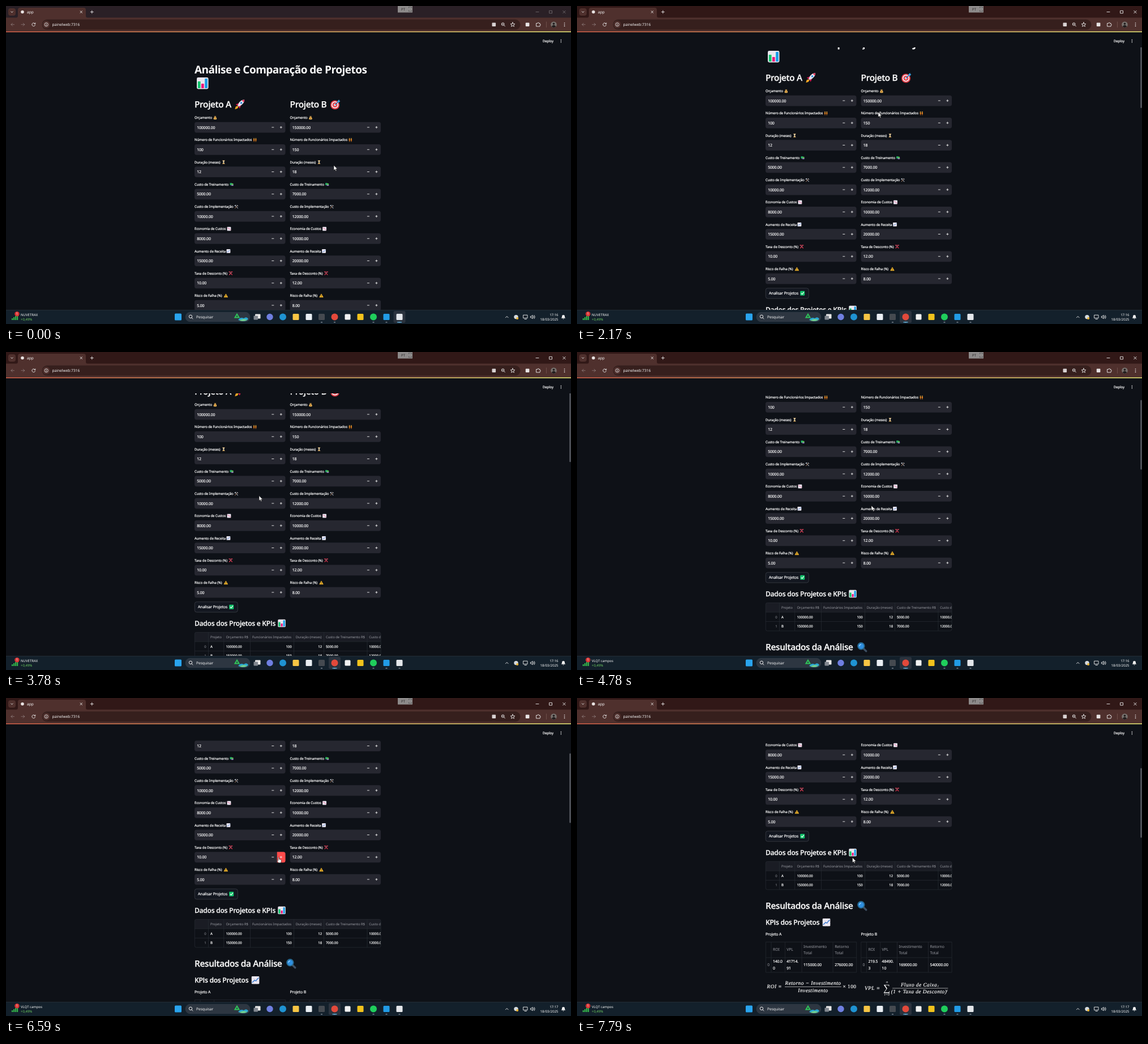
Recreate the animation shown at these times as an HTML page. Size 998 px wide and 561 px high, loop 8000 ms.

```html
<!DOCTYPE html>
<html lang="pt">
<head>
<meta charset="utf-8">
<title>app</title>
<style>
html, body { margin: 0; width: 100%; height: 100%; overflow: hidden; background: #0e1117; }
svg { display: block; width: 998px; height: 561px; }
text { font-family: "Noto Sans", "Open Sans", sans-serif; fill: #fafafa; white-space: pre; text-rendering: geometricPrecision; }
.h1 { font-size: 19px; font-weight: 700; letter-spacing: -.027em; }
.h2, .h3 { font-family: "Open Sans", "Noto Sans", sans-serif; font-weight: 600; letter-spacing: -.023em; stroke: #fafafa; stroke-width: .25px; }
.h2 { font-size: 15.4px; }
.h3 { font-size: 12.1px; }
.lab, .val, .math { stroke: #fafafa; stroke-width: .2px; }
.lab { font-size: 6px; letter-spacing: -.016em; }
.val { font-size: 6.9px; letter-spacing: -.02em; }
.head { font-size: 6px; letter-spacing: -.015em; fill: #9a9ca3; }
.grey { font-size: 6.9px; letter-spacing: -.02em; fill: #9a9ca3; }
.end { text-anchor: end; }
.ui { font-size: 6.6px; }
.sys { font-size: 6px; }
.mid { text-anchor: middle; }
.math { font: italic 9.4px "Liberation Serif", "Noto Serif", serif; letter-spacing: .45px; }
.sub { font: italic 6.5px "Liberation Serif", "Noto Serif", serif; }
.sum { font: 17px "Liberation Serif", "Noto Serif", serif; }
.line { fill: none; stroke: #eee; stroke-width: .9; stroke-linecap: round; stroke-linejoin: round; }
.grid { fill: none; stroke: #282b33; stroke-width: .7; }
</style>
</head>
<body>
<svg id="stage" viewBox="0 0 998 561" xmlns="http://www.w3.org/2000/svg"></svg>
<script>
const text = (x, y, s, cls, extra = '') => `<text x="${x}" y="${y}" class="${cls}" ${extra}>${s}</text>`;
const rect = (x, y, w, h, fill, r = 0, extra = '') => `<rect x="${x}" y="${y}" width="${w}" height="${h}" rx="${r}" fill="${fill}" ${extra}/>`;
const dot = (x, y, r, fill, extra = '') => `<circle cx="${x}" cy="${y}" r="${r}" fill="${fill}" ${extra}/>`;
const path = (d, fill, extra = '') => `<path d="${d}" fill="${fill}" ${extra}/>`;
const line = (d, extra = '') => `<path d="${d}" class="line" ${extra}/>`;
const stroke = (d, color, w) => `<path d="${d}" fill="none" stroke="${color}" stroke-width="${w}" stroke-linecap="round"/>`;

// Pictograms in a 10 x 10 box
const chartPaper = rect(0, 0, 10, 10, '#f1eef6', 1) + stroke('M0 3.3H10M0 6.6H10M3.3 0V10M6.6 0V10', '#cfc6dc', .35);
const icons = {
  bars: rect(0, 0, 10, 10, '#e9e6ee', 1.2) + rect(.9, 3.4, 2.3, 5.9, '#10c46c', .3) + rect(3.9, 5.4, 2.3, 3.9, '#f0157c', .3) + rect(6.9, 1, 2.3, 8.3, '#189de8', .3),
  rocket: path('M1 5 4 3.6 3 6.4ZM5 9 6.4 6 3.6 7Z', '#d3184f') + path('M9.8.2C7 .2 4.4 2 3 6L4 7C8 5.6 9.8 3 9.8.2Z', '#e4dfec')
    + path('M9.8.2 7.2.8 9.2 2.8Z', '#e8284f') + dot(6.6, 3.4, 1, '#2a8fd8') + path('M3 6.4 1 7.2 .2 9.8 2.8 9 3.8 7.2Z', '#f9a825'),
  target: dot(4.6, 5.4, 4.6, '#e33b45') + dot(4.6, 5.4, 3.5, '#f4f1f5') + dot(4.6, 5.4, 2.5, '#e33b45') + dot(4.6, 5.4, 1.2, '#f4f1f5')
    + stroke('M4.6 5.4 8 2', '#2a6fb0', .8) + path('M7 3 7.2 1.4 8.8 0 9 1.2 10 1.5 8.6 3Z', '#35a7e8'),
  money: path('M3.4 3C.5 5.5.2 9.8 2.4 9.8H7.6C9.8 9.8 9.5 5.5 6.6 3L7.6.8 5 1.4 2.4.8Z', '#e9b65a') + rect(3, 2.6, 4, .9, '#8c5a2b', .4) + dot(5, 6.6, 1.6, '#a96d1e'),
  people: [2.6, 7.4].map(x => dot(x, 1.6, 1.4, '#f3b23c') + rect(x - 1.6, 3.2, 3.2, 3.7, '#f58a1f', .8) + rect(x - 1, 6.6, 2, 3.4, '#b5651d')).join(''),
  hourglass: path('M2.5 1H7.5C7.5 4 5.6 4.4 5.6 5S7.5 6 7.5 9H2.5C2.5 6 4.4 5.6 4.4 5S2.5 4 2.5 1Z', '#e8e0c8') + path('M3.2 8.8 5 6.4 6.8 8.8ZM3.6 3H6.4L5 4.8Z', '#e5a93b') + rect(1.8, 0, 6.4, 1.2, '#b98d4f') + rect(1.8, 8.8, 6.4, 1.2, '#b98d4f'),
  books: rect(0, 1.4, 5.6, 5.8, '#20b268', .6) + rect(3.4, 3.2, 5.6, 5.6, '#7646b8', .6) + rect(4, 2.6, 4.6, 4, '#56c64a', .5) + rect(4.4, 7.6, 4.6, .8, '#ded5f0'),
  tools: stroke('M2.2 2.2 8.6 9', '#a9b0ba', 1.5) + stroke('M7.6 2.4 1.6 9', '#8c6a55', 1.5) + path('M0 2.8 2.8.2 4.4 1.6 1.6 4.2Z', '#c3cad3') + stroke('M7 1.2 7.6 2.8 9.2 3.2', '#c3cad3', 1.3),
  down: chartPaper + stroke('M1 2 4 5 5.6 4 9 8', '#e0457a', 1.1),
  up: chartPaper + stroke('M1 8 4 5 5.6 6 9 2', '#3f7fd2', 1.1),
  cut: stroke('M1.6 1 8 8M8.4 1 2 8', '#d8dbe2', 1) + stroke('M.8 1.4H4M6 1.4H9.2M1.4 8.6 4.6 5M8.6 8.6 5.4 5', '#e12f48', 1.8),
  warn: path('M5 .6 9.8 9.2H.2Z', '#f6b92c', 'stroke="#f6b92c" stroke-linejoin="round"') + stroke('M5 3.6V6.2M5 7.8V7.9', '#3a2a12', 1.1),
  check: rect(0, 0, 10, 10, '#12c46b', 1.4) + stroke('M2.4 5.2 4.3 7.2 7.8 2.8', '#fff', 1.4),
  lens: stroke('M6.4 6.4 9 9', '#3d4f62', 1.9) + dot(3.9, 3.9, 3.3, '#2f8fe0', 'stroke="#27688f" stroke-width="1.1"') + stroke('M2.2 3.6A2 2 0 0 1 3.6 2.2', '#a5d9ff', .7)
};
const icon = (name, x, y, size) => `<g transform="translate(${x} ${y}) scale(${size / 10})">${icons[name]}</g>`;

const fields = [
  ['Orçamento', 'money', 366, '100000.00', '150000.00'],
  ['Número de Funcionários Impactados', 'people', 436.3, '100', '150'],
  ['Duração (meses)', 'hourglass', 381, '12', '18'],
  ['Custo de Treinamento', 'books', 395.5, '5000.00', '7000.00'],
  ['Custo de Implementação', 'tools', 403.5, '10000.00', '12000.00'],
  ['Economia de Custos', 'down', 390.5, '8000.00', '10000.00'],
  ['Aumento de Receita', 'up', 389.5, '15000.00', '20000.00'],
  ['Taxa de Desconto (%)', 'cut', 393.5, '10.00', '12.00'],
  ['Risco de Falha (%)', 'warn', 385, '5.00', '8.00']
];
const ROW = 39.25;

function form() {
  let out = '';
  fields.forEach(([label, pic, px, a, b], i) => {
    [a, b].forEach((value, col) => {
      const x = 333 + col * 168.6, y = 204.7 + i * ROW;
      out += text(x, y - 5.5, label, 'lab') + icon(pic, px + col * 168.6, y - 11.2, 6.8)
        + rect(x, y, 160.5, 18.7, '#262730', 3.6);
      if (i === 7 && !col) out += path(`M478.8 ${y}H490a3.5 3.5 0 0 1 3.5 3.5V${y + 15.2}a3.5 3.5 0 0 1-3.5 3.5H478.8Z`, '#ff4b4b', 'id="hot"');
      out += text(x + 4.2, y + 11.8, value, 'val')
        + line(`M${x + 136.7} ${y + 9.3}h3.2M${x + 151.2} ${y + 9.3}h3.2m-1.6-1.6v3.2`);
    });
  });
  return out;
}

function dataTable() {
  const heads = [[361, 'Projeto'], [388.5, 'Orçamento R$'], [435, 'Funcionários Impactados'], [511.8, 'Duração (meses)'], [565, 'Custo de Treinamento R$'], [641.3, 'Custo de Implementação']];
  const rows = [['A', '100000.00', '100', '12', '5000.00', '10000.00'], ['B', '150000.00', '150', '18', '7000.00', '12000.00']];
  const edge = { 2: 504.5, 3: 558 };
  let out = rect(333.3, 598.5, 328.7, 16.5, '#1a1c24');
  out += heads.map(([x, s]) => text(x, 609.2, s, 'head')).join('');
  rows.forEach((row, r) => {
    const y = 625.7 + r * 16.5;
    out += text(353.5, y, r, 'head end');
    row.forEach((s, c) => out += text(edge[c] || heads[c][0], y, s, edge[c] ? 'lab end' : 'lab'));
  });
  const cols = [357.5, 384.7, 431.5, 508.5, 561.5, 638].map(x => `M${x} 598.5V648`).join('');
  return `<g clip-path="url(#tableClip)">${out}<path class="grid" d="${cols}M333 615H662M333 631.5H662"/></g>`
    + rect(333.3, 598.5, 328.7, 49.5, 'none', 3, 'stroke="#282b33" stroke-width=".7"');
}

function kpiTable(x, roi, vpl, cost, gain) {
  const cols = [9.6, 34, 63.7, 118.7].map(d => `M${x + d} 740.5V794`).join('');
  return `<path class="grid" d="M${x} 740.5h160.3v53.5h-160.3zM${x} 768h160.3${cols}"/>`
    + [[12.6, 756.4, 'ROI'], [36.8, 756.4, 'VPL'], [66.6, 750.6, 'Investimento'], [66.6, 762, 'Total'], [121.8, 750.6, 'Retorno'], [121.8, 762, 'Total'], [2.8, 782.8, '0']]
      .map(([d, y, s]) => text(x + d, y, s, 'grey')).join('')
    + [[12.6, 777, roi[0]], [12.6, 788.6, roi[1]], [36.8, 777, vpl[0]], [36.8, 788.6, vpl[1]], [66.6, 782.8, cost], [121.8, 782.8, gain]]
      .map(([d, y, s]) => text(x + d, y, s, 'val')).join('');
}

function formulas() {
  return text(335.5, 822, 'ROI =', 'math') + text(417, 816, 'Retorno − Investimento', 'math mid')
    + text(417, 828.5, 'Investimento', 'math mid') + text(469.5, 822, '× 100', 'math', 'style="font-style:normal"')
    + text(508, 825, 'VPL =', 'math') + text(541, 826.5, '∑', 'sum') + text(547.5, 812.5, 'n', 'sub mid') + text(547.5, 835, 't=0', 'sub mid')
    + text(604, 818.5, 'Fluxo de Caixa', 'math mid') + text(637, 820, 't', 'sub')
    + text(604, 831, '(1 + Taxa de Desconto)', 'math mid') + text(653, 827.5, 't', 'sub')
    + stroke('M367.5 819.5H466.5M557.5 822H655', '#fafafa', .6);
}

function page() {
  return text(333, 118.6, 'Análise e Comparação de Projetos', 'h1') + icon('bars', 337, 126, 20.5)
    + text(333, 179.4, 'Projeto A', 'h2') + icon('rocket', 404, 165, 17.5)
    + text(501.6, 179.4, 'Projeto B', 'h2') + icon('target', 573, 165, 17.5)
    + form()
    + rect(333.3, 544.8, 76, 18.2, '#131720', 3.6, 'stroke="#42454d" stroke-width=".7"')
    + text(339, 556.4, 'Analisar Projetos', 'val') + icon('check', 394.2, 549.8, 8)
    + text(333, 586.8, 'Dados dos Projetos e KPIs', 'h3') + icon('bars', 480.3, 575.8, 13.5)
    + dataTable()
    + text(333, 682.3, 'Resultados da Análise', 'h2') + icon('lens', 495, 668, 17.5)
    + text(333, 710.4, 'KPIs dos Projetos', 'h3') + icon('up', 433.8, 699, 13.5)
    + text(333, 729.4, 'Projeto A', 'val') + text(501.6, 729.4, 'Projeto B', 'val')
    + kpiTable(333.4, ['140.0', '0'], ['41714.', '91'], '115000.00', '276000.00')
    + kpiTable(501.8, ['219.5', '3'], ['48490.', '10'], '169000.00', '540000.00')
    + formulas();
}

function browser() {
  return rect(0, 0, 998, 23, '#311817', 0, 'id="strip"') + rect(0, 20.5, 998, 24.3, '#4f302d')
    + path('M17 21Q21 21 21 17V7Q21 3 25 3H137Q141 3 141 7V17Q141 21 145 21Z', '#4f302d')
    + rect(4, 4, 13, 13, '#4f302d', 4) + line('M8.8 9.8 10.5 11.4 12.2 9.8')
    + dot(29, 10.5, 2.8, '#e8e2e2') + text(37, 13, 'app', 'ui')
    + line('M131 8.7 134.6 12.3M134.6 8.7 131 12.3M149.3 10.5H154.3M151.8 8V13')
    + `<g id="controls">${line('M936 10.5H941M960 8.3H964.5V12.8H960ZM983.7 8.3 988.2 12.8M988.2 8.3 983.7 12.8', 'stroke-width=".7"')}</g>`
    + line('M14.5 32.7H9M11.5 30.2 9 32.7 11.5 35.2M27 32.7H32.7M30.2 30.2 32.7 32.7 30.2 35.2', 'opacity=".35"')
    + line('M51.4 31.4A2.9 2.9 0 1 0 51.6 33.6M51.8 29.8V31.6H50')
    + rect(63.5, 23.8, 845, 18, '#361f1d', 9)
    + dot(71.2, 32.7, 6.4, '#4f302d') + dot(71.2, 32.7, 3.1, 'none', 'stroke="#eee" stroke-width=".8"') + line('M71.2 32.6V34.2M71.2 31.1V31.2')
    + text(81.5, 35.2, 'painelweb:7316', 'ui')
    + rect(858.5, 29.4, 6.6, 6.6, '#d8d2d2', 1)
    + dot(877.7, 32, 2.4, 'none', 'stroke="#eee" stroke-width=".9"') + line('M879.5 33.8 881.4 35.8M876.7 32H878.7')
    + line('M895 28.9 896.1 31.5 898.8 31.7 896.7 33.5 897.4 36.2 895 34.7 892.6 36.2 893.3 33.5 891.2 31.7 893.9 31.5Z', 'stroke-width=".8"')
    + rect(917.8, 29.4, 6.6, 6.6, '#e8e4e4', 1)
    + line('M937 30.5H939A1.2 1.2 0 0 1 941.4 30.5H943V32A1.2 1.2 0 0 1 943 34.4V36H937Z')
    + stroke('M954.5 28V37.5', '#7a5c58', .7)
    + dot(967.5, 32.7, 5.3, '#77716d') + dot(967.5, 31.2, 1.8, '#211d1d') + path('M963.6 36.2Q967.5 30.6 971.4 36.2Q967.5 39.6 963.6 36.2Z', '#211d1d')
    + [30, 32.7, 35.4].map(y => dot(986.5, y, .8, '#eee')).join('')
    + rect(0, 44.8, 998, 1.4, 'url(#deco)')
    + text(948, 64, 'Deploy', 'lab') + [59.6, 61.8, 64].map(y => dot(980.4, y, .75, '#fafafa')).join('')
    + rect(692, 0, 26, 11.5, '#8d8a8a') + text(698, 7.8, 'PT', 'sys', 'style="fill:#2a2626"')
    + stroke('M711.5 3.2V1.6H713M714.8 1.6H716.3V3.2M711.5 7.8V9.4H713M714.8 9.4H716.3V7.8', '#444', .7);
}

function taskbar() {
  const square = (x, c, s = 11) => rect(x - s / 2, 548.5 - s / 2, s, s, c, 1.5);
  return rect(0, 536, 998, 25, '#13202b') + rect(0, 536, 998, .6, '#2c343f')
    + rect(10, 551, 2.2, 3, '#33b34a') + rect(13, 549, 2.2, 5, '#33b34a') + rect(16, 547, 2.2, 7, '#33b34a') + rect(19, 545, 2.2, 9, '#33b34a')
    + dot(19.5, 543.3, 4.2, '#d93636') + text(19.5, 545.4, '1', 'sys mid')
    + '<text id="ticker" x="26" y="546.8" class="sys"></text>' + text(26, 554.8, '+0,49%', 'sys', 'style="fill:#6ccb5f"')
    + square(304, '#29a4ee', 12)
    + rect(317, 540.3, 114, 16.5, '#2d3641', 8.2, 'stroke="#3b444f" stroke-width=".5"')
    + dot(326, 547.8, 2.7, 'none', 'stroke="#eee" stroke-width="1"') + line('M328 549.8 330 552') + text(336, 551, 'Pesquisar', 'ui')
    + stroke('M404.5 549.5 408 543.6 411.5 549.5Z', '#2fc45a', 2) + path('M410 554Q414 548 420 551Q425 547 428 552Q426 556 418 556Z', '#2ba7d0') + path('M412 555Q419 550 426 554Q421 557 412 555Z', '#79d28a')
    + rect(440, 543.5, 9.5, 8, '#e8e8e8', 1) + rect(437.5, 546.5, 7.5, 7, '#818890', 1)
    + dot(466, 548.5, 5.7, '#6f7fe0') + dot(489, 548.5, 6, '#1f93d2')
    + square(512, '#f6c544') + square(535, '#e9eef3')
    + square(557.5, '#454a50')
    + '<rect id="active" y="538" width="21" height="21" rx="2.5" fill="#2b333e"/>'
    + dot(580.5, 548.5, 6, '#e2493b') + square(603.5, '#f1f1f1', 10) + square(626, '#f2c31c')
    + dot(649, 548.5, 6, '#1fce5c') + square(672, '#219be6') + square(695, '#e3e6ea')
    + [557.5, 580.5, 649, 672, 695].map(x => rect(x - 1.6, 557.3, 3.2, 1.2, '#929aa5', .6)).join('')
    + '<rect id="underline" y="557.2" width="8.4" height="1.4" rx=".7" fill="#62c0f0"/>'
    + line('M882.5 549.8 884.8 547.4 887.1 549.8') + dot(901, 548.6, 3.7, '#d5dade') + dot(903.2, 551, 2, '#f2b632')
    + line('M914 545.2H921V550.6H914ZM916 552.5H919.4M926.8 547.4H928.2L930 545.4V551.8L928.2 549.8H926.8ZM931.7 547Q933 548.6 931.7 550.2M933.2 545.7Q935.5 548.6 933.2 551.5', 'stroke-width=".8"')
    + '<text id="clock" x="975.5" y="546.8" class="sys end"></text>' + text(975.5, 554.8, '18/03/2025', 'sys end')
    + path('M980.7 550.7 982 549V547.4A2.5 2.5 0 0 1 987 547.4V549L988.2 550.7ZM983.2 551.5H985.8L984.5 552.7Z', '#eee');
}

const cursors = `<g id="mouse"><path id="arrow" d="M0 0V9L2.1 7.1 3.5 10.2 4.9 9.6 3.6 6.6H6.4Z" fill="#fff" stroke="#111" stroke-width=".6"/>
<path id="hand" d="M-.8.4Q0-.7.8.4V3.4L3.9 4.1Q5 4.5 4.8 6L4.1 9.8H-.3L-2.6 6.3Q-2.4 5.1-.8 6Z" fill="#fff" stroke="#111" stroke-width=".6"/></g>`;

const stage = document.getElementById('stage');
stage.innerHTML = `<defs>
<linearGradient id="deco"><stop stop-color="#e8694f"/><stop offset="1" stop-color="#fffd80"/></linearGradient>
<clipPath id="view"><rect y="73" width="998" height="463"/></clipPath>
<clipPath id="tableClip"><rect x="333" y="598" width="329" height="51" rx="3"/></clipPath>
</defs>${rect(0, 0, 998, 561, '#0e1117')}
<g clip-path="url(#view)"><g id="page">${page()}</g>${rect(995, 0, 3, 123, '#4b4e55', 1.5, 'id="thumb"')}</g>
${browser()}${taskbar()}${cursors}`;

const [sheet, thumb, hot, strip, controls, ticker, clock, active, underline, mouse, arrow, hand] =
  ['page', 'thumb', 'hot', 'strip', 'controls', 'ticker', 'clock', 'active', 'underline', 'mouse', 'arrow', 'hand'].map(id => document.getElementById(id));

// Held steps: [ms, scroll] and [ms, x, y]
const scrolls = [[0, 0], [2170, 47], [2370, 52], [2560, 54], [2760, 104], [4780, 156], [5590, 190], [5790, 208], [7000, 230], [7200, 260], [7790, 310]];
const moves = [
  [0, 579, 281], [200, 575, 272], [390, 560, 250], [590, 520, 222], [790, 465, 195], [990, 425, 180], [1150, 412, 176],
  [1360, 440, 180], [1570, 525, 186], [1770, 597, 189], [2170, 532, 187], [2370, 531, 189], [2560, 529.5, 191],
  [3180, 510, 205], [3380, 482, 228], [3580, 457, 247], [3780, 447, 253.5], [3980, 429, 262], [4180, 470, 269],
  [4380, 500, 270], [4580, 520, 271], [5000, 531, 272], [5390, 532, 273],
  [6390, 505, 277], [6590, 481.5, 281], [7000, 484, 281], [7200, 486.5, 281.5]
];
const at = (steps, t) => steps.findLast(step => step[0] <= t);
const put = (el, name, value) => el.setAttribute(name, value);
const show = (el, on) => put(el, 'visibility', on ? 'visible' : 'hidden');

function draw(t) {
  const scroll = at(scrolls, t)[1], [, x, y] = at(moves, t);
  const focused = t >= 200, hover = t >= 6590 && t < 7000;
  put(sheet, 'transform', `translate(0 ${-scroll})`);
  put(thumb, 'y', 45 + scroll * .253);
  show(thumb, focused);
  put(strip, 'fill', focused ? '#311817' : '#2a2026');
  put(controls, 'opacity', focused ? 1 : .35);
  put(active, 'x', focused ? 570 : 684.5);
  put(underline, 'x', focused ? 576.3 : 690.8);
  ticker.textContent = t < 4380 ? 'NUVETRAX' : 'VLQT campos';
  clock.textContent = t < 6390 ? '17:16' : '17:17';
  show(hot, hover);
  show(hand, hover);
  show(arrow, !hover);
  put(mouse, 'transform', `translate(${x} ${y})`);
}

const start = performance.now();
function tick() {
  draw((performance.now() - start) % 8000);
  requestAnimationFrame(tick);
}
tick();
</script>
</body>
</html>
```
